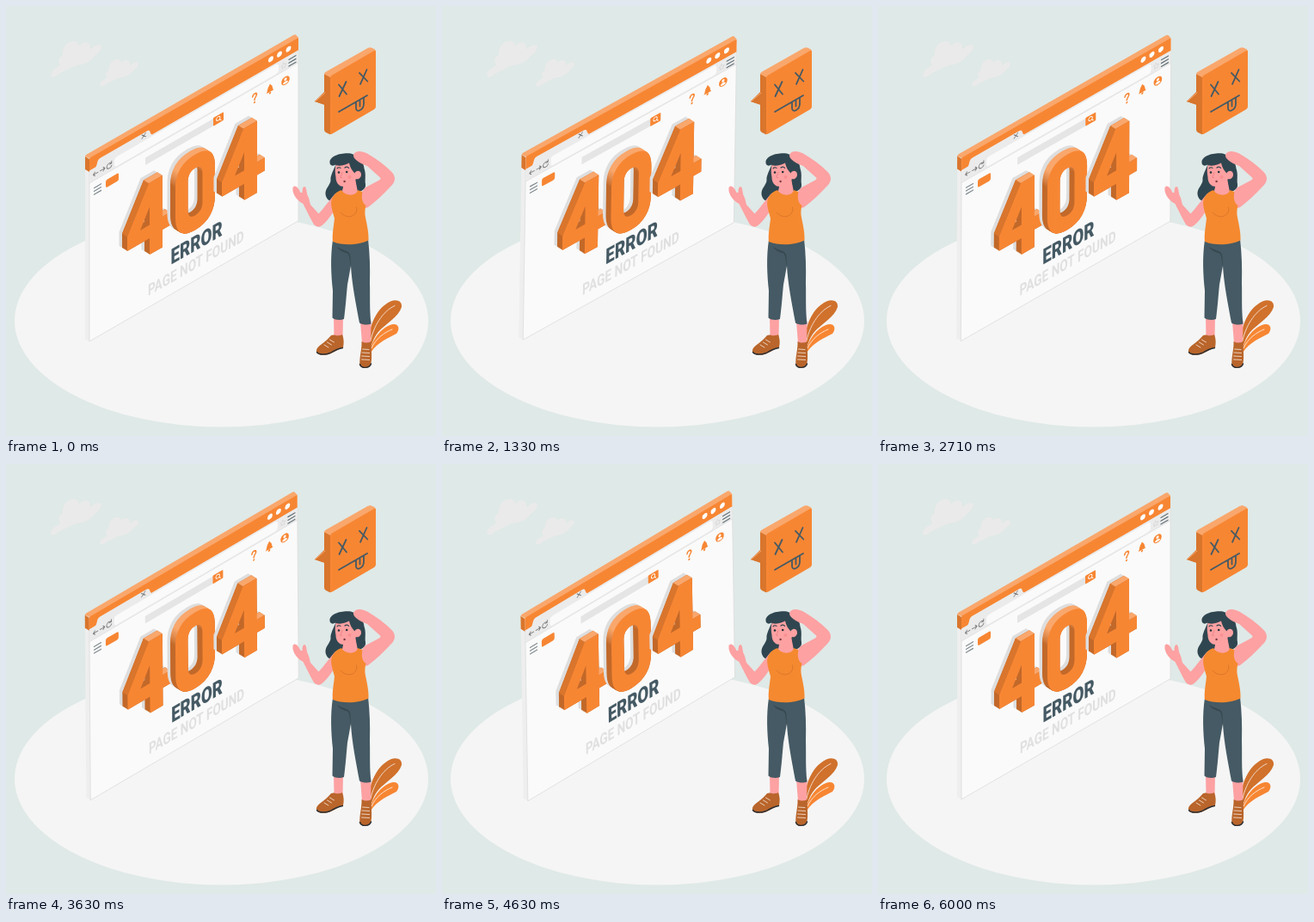
An HTML page with a canvas that plays this animation: 500 by 500 pixels, repeating every 6.04 s.

```html
<!DOCTYPE html>
<html lang="en">
<head>
<meta charset="utf-8">
<title>404 error</title>
<style>
html, body { margin: 0; width: 100%; height: 100%; overflow: hidden; background: #dfe9e7; }
canvas { display: block; width: 500px; height: 500px; }
</style>
</head>
<body>
<canvas id="stage"></canvas>
<script>
const canvas = document.getElementById('stage');
const ctx = canvas.getContext('2d');
const ratio = Math.max(1, window.devicePixelRatio || 1);
canvas.width = canvas.height = 500 * ratio;

const ORANGE = '#f78633', LIGHT = '#f9a76c', MID = '#d9752c', DARK = '#c2692a';
const SLATE = '#455a64', HAIR = '#2f4650', SKIN = '#fda1a2', BROWN = '#b9652b';
const LOOP = 6040, SWING = 6000, SLOPE = 0.577;

function fill(d, color, rule) {
  ctx.fillStyle = color;
  ctx.fill(new Path2D(d), rule || 'nonzero');
}

function line(d, color, width) {
  ctx.strokeStyle = color;
  ctx.lineWidth = width;
  ctx.lineCap = ctx.lineJoin = 'round';
  ctx.stroke(new Path2D(d));
}

function dot(x, y, r, color) {
  ctx.fillStyle = color;
  ctx.beginPath();
  ctx.arc(x, y, r, 0, 2 * Math.PI);
  ctx.fill();
}

function box(x, y, w, h, r, color) {
  ctx.fillStyle = color;
  ctx.beginPath();
  ctx.roundRect(x, y, w, h, r);
  ctx.fill();
}

function placed(x, y, scale, draw) {
  ctx.save();
  ctx.translate(x, y);
  ctx.scale(scale, scale);
  draw();
  ctx.restore();
}

// Sweeps a shape backwards along the depth direction.
function sweep(d, from, to, color) {
  for (let k = to; k >= from; k -= 0.5) {
    ctx.save();
    ctx.translate(-k, -1.2 * k);
    fill(d, color, 'evenodd');
    ctx.restore();
  }
}

function cloud() {
  fill('M0,41 C-2,38 1,34 4,32 C6,30 9,30 10,27 C7,23 9,17 13,17 C12,8 17,1 24,0 C29,-1 32,3 32,6 C34,2 41,-1 44,4 C45,6 45,8 45,10 C49,5 55,3 57,5 C59,10 54,14 51,16 C48,20 44,24 38,26 C34,28 30,27 26,29 L8,38 C5,41 2,43 0,41 Z', '#ebeaea');
}

function background() {
  ctx.fillStyle = '#dfe9e7';
  ctx.fillRect(0, 0, 500, 500);
  placed(53, 41, 1, cloud);
  placed(110, 62, 0.76, cloud);
  ctx.fillStyle = '#f5f5f5';
  ctx.beginPath();
  ctx.ellipse(250.5, 366, 240.5, 123.5, 0, 0, 2 * Math.PI);
  ctx.fill();
}

function menuIcon(x, y, color) {
  for (let i = -1; i <= 1; i++) line(`M${x - 4},${y + i * 3.8} h8`, color, 1.3);
}

const FOUR = 'M25,0 H41 V48 H50 V63 H41 V83.5 H26 V64.5 H0 V48 Z M26,28 L15,49 H26 Z';
const ZERO = 'M23,0 C39,0 46,10 46,26 V61 C46,77 39,88 23,88 C7,88 0,77 0,61 V26 C0,10 7,0 23,0 Z' +
  'M23,16 C17.5,16 14.5,20 14.5,27 V60 C14.5,67 17.5,71 23,71 C28.5,71 31.5,67 31.5,60 V27 C31.5,20 28.5,16 23,16 Z';

function four() {
  sweep(FOUR, 6, 9.5, '#dedede');
  sweep(FOUR, 0, 6, DARK);
  fill('M25,0 L0,48 L-6,40.8 L19,-7.2 Z', MID);
  fill('M25,0 H41 L35,-7.2 H19 Z M41,48 H50 L44,40.8 H35 Z', LIGHT);
  fill(FOUR, ORANGE, 'evenodd');
}

function zero() {
  const shade = ctx.createLinearGradient(0, -4, 0, 26);
  shade.addColorStop(0, LIGHT);
  shade.addColorStop(0.45, LIGHT);
  shade.addColorStop(1, DARK);
  sweep(ZERO, 6, 9.5, '#dedede');
  sweep(ZERO, 0, 6, shade);
  fill(ZERO, ORANGE, 'evenodd');
}

function label(text, x, y, font, color) {
  ctx.save();
  ctx.translate(x, y);
  ctx.scale(0.75, 1);
  ctx.font = font + ' Roboto, "Open Sans", sans-serif';
  ctx.fillStyle = color;
  ctx.fillText(text, 0, 0);
  ctx.restore();
}

function toolbar() {
  box(0, 14.5, 243, 14.5, 0, '#ebebeb');
  fill('M4,16 C8,15 8,14 9,11 C9.5,8 11,7 13,7 H66 C69,7 70,8 70.5,10 C71.5,13 72,15 75,16 Z', '#ebebeb');
  line('M61,8.2 l4.4,4.4 M65.4,8.2 l-4.4,4.4', '#777', 0.9);
  box(29, 16.5, 191, 11, 3, '#fafafa');
  line('M10,22 H4.5 m2,-2.2 l-2,2.2 l2,2.2 M12.5,22 H18 m-2,-2.2 l2,2.2 l-2,2.2', '#777', 0.9);
  line('M25.3,20 A3,3 0 1 0 26,23 M25.8,18 v2.6 h-2.4', '#777', 0.9);
  line('M226,19.5 l1,2 l2,.3 l-1.5,1.5 l.4,2.2 l-1.9,-1 l-1.9,1 l.4,-2.2 l-1.5,-1.5 l2,-.3 Z', '#d2d2d2', 0.6);
  menuIcon(236, 23, '#5d6b72');
  line('M0,29 H243', '#e0e0e0', 0.7);
}

function pageHeader() {
  menuIcon(9.5, 41.5, '#7b858a');
  box(19, 36.5, 15, 9, 2, ORANGE);
  box(65, 37, 79, 8.5, 0, '#e5e5e5');
  box(144, 36.2, 12, 9.6, 1, ORANGE);
  line('M152,40.3 a2.2,2.2 0 1 1 -4.4,0 a2.2,2.2 0 1 1 4.4,0 M151.4,42 l1.6,1.8', '#fff', 0.9);
  line('M189.8,38.2 C190,34.8 194.8,35 194.4,38.4 C194.2,40.2 192,40.4 192,43', ORANGE, 1.7);
  dot(192, 45.8, 1.1, ORANGE);
  fill('M205.6,44 C207.4,43 206.5,36.5 210,36.2 C213.5,36.5 212.6,43 214.4,44 Z', ORANGE);
  dot(210, 45.3, 1.2, ORANGE);
  dot(210, 36, 0.9, ORANGE);
  dot(228, 41.3, 4.8, ORANGE);
  dot(228, 39.7, 1.6, '#fff');
  fill('M225,44 C225.4,41.2 230.6,41.2 231,44 C229.5,45.2 226.5,45.2 225,44 Z', '#fff');
}

function browser(angle) {
  ctx.save();
  ctx.translate(216, 212);
  ctx.rotate(angle);
  ctx.translate(-216, -212);
  ctx.transform(1, -SLOPE, 0, 1, 97, 177);

  fill('M0,14 L-5,8 V207 L0,213 Z', '#eeeeee');
  box(0, 0, 243, 213, [0, 0, 1, 1], '#fafafa');
  line('M0,15 V213 H243 V15', '#dcdcdc', 0.7);
  fill('M0,1 L-5,-5 V10 L0,16 Z', MID);
  fill('M0,0 L-5,-5 Q-4.5,-6.5 -3,-6.3 H237 Q239,-6.3 240,-5 L243,0 V2 H0 Z', LIGHT);
  box(0, 0, 243, 15, [2, 2, 0, 0], ORANGE);
  for (const u of [211, 221, 231.5]) dot(u, 6.6, 3, '#fff');
  toolbar();
  pageHeader();

  placed(44, 69, 1, four);
  placed(100, 66.5, 1, zero);
  placed(154, 69, 1, four);
  label('ERROR', 94.5, 178.6, '900 25px', SLATE);
  label('PAGE NOT FOUND', 68, 199.6, '700 18.2px', '#e0e0e0');
  ctx.restore();
}

function bubble() {
  fill('M359,111 L371,99 L377,97 V117 L371,115 Z', MID);
  fill('M370,79 L377,82 V149.5 L372,147 Q370,146 370,144 Z', MID);
  fill('M359,111 L370,101 L376,99 L377,117 Z', MID);
  line('M360,110.5 L371,101', LIGHT, 1);
  fill('M370,79 Q370,77.5 372,76.5 L421,48.8 Q423,47.8 425,48.6 L429,50.5 L430,53 L377,83 Z', LIGHT);
  fill('M377,83.5 Q377,81.5 379,80.5 L428,52 Q430,51 430,53 V117 Q430,119 428,120.2 L379,148.8 Q377,150 377,148 Z', ORANGE);
  line('M387,91.5 L396,102.5 M395.5,88 L387.5,105 M411,77.8 L420.3,87.5 M419.5,74 L412,90.8', SLATE, 1.8);
  line('M387,123 L420,104 M407,112 V118.5 C407,125 416,121 416,113.5 V107 M411.5,110 V116.5', SLATE, 1.8);
}

function leaves() {
  fill('M421,402 C420,376 429,352 447,343.5 C454,340.5 461,343 460,350 C457,361 441,370 433,379 C427,386 425,395 422,403 Z', '#d0712c');
  line('M423,393 C427,372 438,355 452,348.5', '#f6e3d6', 0.9);
  fill('M423,403 C426,386 439,371 451,370 C457,370 458,376 454,381 C445,386 433,390 424,403 Z', ORANGE);
  line('M425,398 C430,387 439,380 449,376', '#fbe9dc', 0.9);
}

function legs() {
  fill('M381,361 H392 L391.5,386 C388,389 384,388 381.5,385 Z M412,367 H424.5 L424,393 C420,395 416,394 414,392 Z', SKIN);
  fill('M361,400 C362,395 371,392 378,383 C382,381 385,385 391,382 C393,387 393,392 392,397 C385,399 381,404 373,405.5 C367,406.5 361,405 361,402 Z', BROWN);
  line('M361.5,402.5 C364,406 372,405.5 377,403.5 C383,400 386,398.5 391.5,397.5', '#2c2f33', 1.4);
  line('M370,394 l5,3 M373.5,391 l5,3 M376.5,388 l5,3', '#f3dccb', 0.9);
  fill('M413.5,390 C417,392 421,392 425,390 C424,400 426.5,409 424,417 C422,421.5 414,422 411.5,418 C410.5,409 414,399 413.5,390 Z', BROWN);
  line('M411.5,416.5 C413,422 423,421.5 424.5,416', '#2c2f33', 1.4);
  line('M414.5,399 l7.5,.5 M414,403 l8.5,.5 M413.5,407 l9,.5 M413.5,411 l9,.5', '#f3dccb', 0.9);
  fill('M380,272 C377,292 378,312 380,331 L379.5,362.5 C383,365.5 389,365.5 393,364 C395,349 396,334 397,324 L401,302 C402,322 407,347 411,368.5 C415,371 421,371 424.5,369.5 C422.5,352 423.5,339 423,322 C423.5,304 423,288 421,271 Z', SLATE);
  fill('M385,280 C390,284 398,284 400,289 C401,294 400.5,298 401,305 C399.5,296 400,290 397,287.5 C393,286 388,285 385,280 Z', '#37474f');
}

function torso() {
  fill('M393,206 L406,201 L409,216 C408,224 395,224 391,215 Z', SKIN);
  fill('M390,214 C386,215 382,218 379.5,223 C376,229 380,239 382,247 C381,257 379,266 380,274 C392,279 411,278 421.5,272.5 C422,262 419,252 417.5,243 C417,238 418,234 418.5,232 C414,229 413,223 414.5,216 L409,214 C408,221 395,222 390,214 Z', '#f5892f');
  line('M389,240 C394,246 403,247 407,240 C408,238 408,236 407.5,234', '#d9752c', 0.9);
}

function arms() {
  fill('M404,173 C406,168 413,168 420,171.5 C431,178 441,185 449,193.5 C453,198.5 453,203 449,208 C440,218 430,227 421,234 C416,237 412,229 412.5,223 C413,217 415,213 419,210.5 L434,202.5 C436,201 436,200 434.5,199 L420,186 C412,183 403,178 404,173 Z', SKIN);
  fill('M333.5,211 C336,207 340,211 342.5,217 L344.5,217 C344.5,212 346,208.5 348,210.5 C350,213 349,217 351,221 C353,225 353,228 354,231 L363.5,241.5 C369,236 376,226 382,219 C386,215 389,222 386.5,228 C382,239 374,250 367,255.5 C364,257.5 361,257 358,254 C354,247 349,237 345.5,230 C340,227 335,222 333.5,215 Z', SKIN);
}

function head() {
  fill('M376.5,182 C376,174 391,170 401,171.5 C410,174 416,181 416.5,189 C419,196 417,202 418,207 C419,213 413,217 406,215 L393,214 C387,218 388,224 383,227 C376,229 371,223 371.5,217 C372,211 378,207 377.5,202 C377,198 381,190 383.5,184.5 C379,187 376.5,185 376.5,182 Z', HAIR);
  fill('M393,207 L406,201 L407,213 C404,218 395,219 392,214 Z', SKIN);
  fill('M383.5,185 C390,187 396,184 399,182.5 C400,187 402,191 405.5,194.5 C407,190.5 413,191 413,196 C413,200 409.5,202 407,201 C405,206 399,210 393,210 C386.5,210 383.5,205 383.5,199 C382.5,194 382.5,189 383.5,185 Z', SKIN);
  line('M385,188.8 C386,187.6 388,187.6 389,188.4 M394,188 C395.5,186.6 397.5,187 398.5,188.4', HAIR, 1.2);
  dot(387, 193.5, 1.3, '#263238');
  dot(396.2, 193, 1.3, '#263238');
  line('M391,193.5 C390.5,196 389,198 388.6,199.2 L390.6,199.7', '#e67f85', 0.8);
  dot(393.6, 204, 1.2, '#7a3b43');
  dot(399.5, 199, 2, '#fa9093');
}

function woman() {
  leaves();
  legs();
  head();
  arms();
  torso();
}

// Linear swing: 0, +1, -1, 0 degrees.
function swing(t) {
  const p = Math.min(t % LOOP, SWING) / SWING;
  const degrees = p < 0.25 ? 4 * p : p < 0.75 ? 2 - 4 * p : 4 * p - 4;
  return degrees * Math.PI / 180;
}

const start = performance.now();

function frame(now) {
  ctx.setTransform(ratio, 0, 0, ratio, 0, 0);
  background();
  browser(swing(Math.max(0, now - start)));
  bubble();
  woman();
  requestAnimationFrame(frame);
}
frame(start);
</script>
</body>
</html>
```
